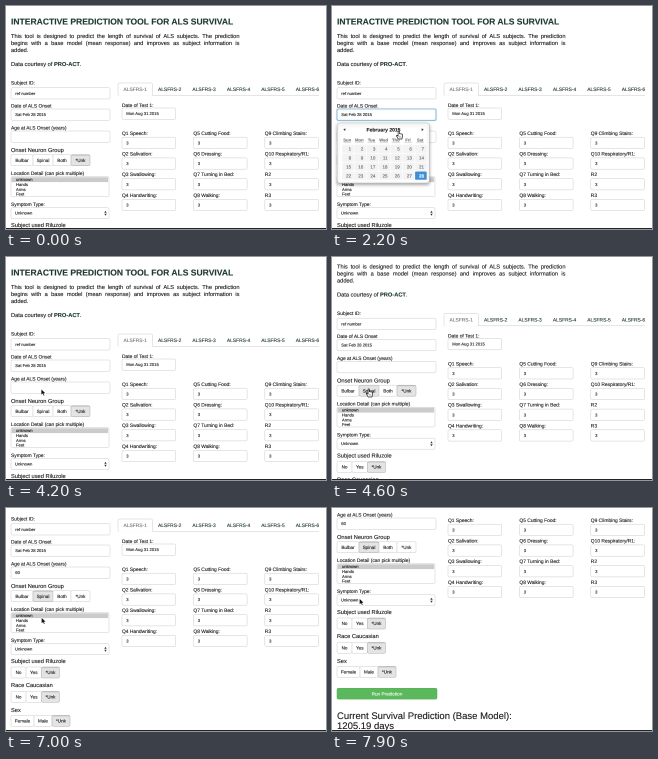
An HTML page with a canvas that plays this animation: 320 px wide and 223 px high, repeating every 8 s.

```html
<!DOCTYPE html>
<html lang="en">
<head>
<meta charset="utf-8">
<title>Prediction form</title>
<style>
  html, body { margin: 0; width: 100%; height: 100%; overflow: hidden; background: #fff; }
  canvas { display: block; width: 320px; height: 223px; }
</style>
</head>
<body>
<canvas id="stage" width="640" height="446"></canvas>
<script>
const ctx = document.getElementById('stage').getContext('2d');
const LOOP = 8000, STEP = 100;
const INK = '#1c1c1c', GREEN = '#1f3a2e', LINE = '#ccc', BLUE = '#6aa6c6';
const FAMILY = '"Liberation Sans", Arial, sans-serif';
const HEADING = 5.7, LABEL = 4.9, BUTTON = 4.6, SMALL = 4.15;

const PICKER = [1600, 3200], DATE_FOCUS = [1500, 3300], AGE_FOCUS = [5400, 6600];
const SCROLL = [[0, 0], [4600, 20.5], [4700, 21], [6800, 47], [6900, 62], [7000, 66], [7400, 114], [7500, 114.5], [7700, 115]];
const POINTER = [
  [200, 268, 198, 'arrow'], [400, 170, 120, 'arrow'], [600, 40, 48, 'arrow'], [700, 9, 75, 'arrow'],
  [900, 63, 104, 'arrow'], [1200, 63, 104, 'arrow'], [1300, 67, 109, 'beam'], [1700, 67, 109, 'beam'],
  [1800, 72, 119, 'arrow'], [1900, 67, 128.5, 'hand'], [2100, 67, 128.5, 'hand'], [2200, 67.5, 129, 'hand'],
  [2500, 67.5, 129, 'hand'], [2600, 77, 146, 'hand'], [2700, 91, 163, 'hand'], [2800, 91, 163, 'hand'],
  [3000, 90.5, 170, 'hand'], [3100, 90.5, 170, 'hand'], [3200, 89.5, 167, 'arrow'], [3500, 89.5, 167, 'arrow'],
  [3800, 52, 118, 'arrow'], [4000, 35, 131, 'arrow'], [4200, 35.2, 132, 'arrow'], [4600, 37.5, 136, 'hand'],
  [4800, 37.5, 136, 'hand'], [4900, 37.5, 124, 'arrow'], [5000, 37, 113, 'beam'], [5200, 37, 113, 'beam'],
  [5300, 37, 111, 'beam'], [6200, 37, 111, 'none'], [6600, 35.5, 109.5, 'arrow'], [7300, 35.5, 109.5, 'arrow'],
  [7400, 36, 118, 'arrow'], [7900, 27.5, 90.5, 'arrow']
];

const within = (t, [from, to]) => t >= from && t < to;

function latest(keys, t) {
  let i = keys.length - 1;
  while (i >= 0 && keys[i][0] > t) i--;
  return i;
}

function setFont(size, bold) {
  ctx.font = `${bold ? 'bold ' : ''}${size}px ${FAMILY}`;
}

// y is the middle of the capital letters; the thin stroke thickens small type
function text(str, x, y, size = LABEL, { color = INK, bold = false, align = 'left' } = {}) {
  setFont(size, bold);
  ctx.fillStyle = ctx.strokeStyle = color;
  ctx.lineWidth = 0.12;
  ctx.textAlign = align;
  ctx.fillText(str, x, y + size * 0.36);
  ctx.strokeText(str, x, y + size * 0.36);
  return ctx.measureText(str).width;
}

function justified(str, x, y, width) {
  setFont(HEADING);
  const words = str.split(' ');
  const widths = words.map(w => ctx.measureText(w).width);
  const gap = (width - widths.reduce((a, b) => a + b)) / (words.length - 1);
  words.forEach((w, i) => {
    text(w, x, y, HEADING);
    x += widths[i] + gap;
  });
}

function box(x, y, w, h, { fill = '#fff', stroke = LINE, radius = 1.3, line = 0.5 } = {}) {
  ctx.beginPath();
  ctx.roundRect(x, y, w, h, radius);
  ctx.fillStyle = fill;
  ctx.fill();
  if (!stroke) return;
  ctx.strokeStyle = stroke;
  ctx.lineWidth = line;
  ctx.stroke();
}

function rule(x1, y1, x2, y2, color = LINE, width = 0.5) {
  ctx.strokeStyle = color;
  ctx.lineWidth = width;
  ctx.beginPath();
  ctx.moveTo(x1, y1);
  ctx.lineTo(x2, y2);
  ctx.stroke();
}

function shape(points, fill, stroke) {
  ctx.beginPath();
  points.forEach(([x, y]) => ctx.lineTo(x, y));
  ctx.closePath();
  ctx.fillStyle = fill;
  ctx.fill();
  if (!stroke) return;
  ctx.strokeStyle = stroke;
  ctx.lineWidth = 0.7;
  ctx.stroke();
}

function field(x, y, w, value, focused = false, caret = false) {
  ctx.save();
  if (focused) {
    ctx.shadowColor = 'rgba(80,150,200,.45)';
    ctx.shadowBlur = 3;
  }
  box(x, y, w, 11.3, { stroke: focused ? BLUE : LINE, line: focused ? 0.6 : 0.5 });
  ctx.restore();
  const width = text(value, x + 4.3, y + 5.7, SMALL);
  if (caret) rule(x + 5 + width, y + 3.2, x + 5 + width, y + 8.8, '#222');
}

function buttons(y, items, active, hover) {
  let x = 5;
  for (const [label, w] of items) {
    const pressed = label === active || label === hover;
    box(x, y, w, 11, { fill: pressed ? '#e4e4e4' : '#fff', stroke: pressed ? '#adadad' : LINE });
    if (label === active) rule(x + 0.5, y + 0.7, x + w - 0.5, y + 0.7, '#c4c4c4', 0.8);
    text(label, x + w / 2, y + 5.5, BUTTON, { align: 'center' });
    x += w;
  }
}

function intro() {
  text('INTERACTIVE PREDICTION TOOL FOR ALS SURVIVAL', 5, 15.6, 8.55, { color: GREEN, bold: true });
  justified('This tool is designed to predict the length of survival of ALS subjects. The prediction', 5, 29.8, 228.5);
  justified('begins with a base model (mean response) and improves as subject information is', 5, 36.8, 228.5);
  text('added.', 5, 43.8, HEADING);
  let x = 5 + text('Data courtesy of ', 5, 58, HEADING);
  x += text('PRO-ACT', x, 58, HEADING, { color: GREEN, bold: true });
  text('.', x, 58, HEADING);
}

function symptomForm(t) {
  const choice = [['No', 15], ['Yes', 15.5], ['*Unk', 18]];
  text('Subject ID:', 5, 76.8);
  field(5, 81.7, 99, 'ref number');

  const dateCaret = within(t, [1500, 1900]) || within(t, [2400, 2900]);
  text('Date of ALS Onset', 5, 99.8);
  field(5, 103, 99, 'Sat Feb 28 2015', within(t, DATE_FOCUS), dateCaret);

  const age = '60'.slice(0, t < 6200 ? 0 : t < 6300 ? 1 : 2);
  const ageCaret = within(t, [5400, 5900]) || within(t, [6200, 6600]);
  text('Age at ALS Onset (years)', 5, 121.8);
  field(5, 125, 99, age, within(t, AGE_FOCUS), ageCaret);

  text('Onset Neuron Group', 5, 144, HEADING);
  buttons(148.7, [['Bulbar', 22], ['Spinal', 20], ['Both', 18], ['*Unk', 19]],
    t < 4700 ? '*Unk' : 'Spinal', within(t, [4600, 4900]) ? 'Spinal' : '');

  text('Location Detail (can pick multiple)', 5, 167);
  box(5, 170.7, 98, 19.8);
  ctx.fillStyle = '#cbcbcb';
  ctx.fillRect(5.6, 171.3, 96.5, 4.8);
  ['unknown', 'Hands', 'Arms', 'Feet'].forEach((s, i) => text(s, 10, 173.7 + i * 4.85, SMALL));

  text('Symptom Type:', 5, 198);
  box(5, 201.7, 98, 11);
  text('Unknown', 9, 207.2, SMALL);
  shape([[98.3, 206.7], [99.5, 204.7], [100.7, 206.7]], '#333');
  shape([[98.3, 207.7], [99.5, 209.7], [100.7, 207.7]], '#333');

  text('Subject used Riluzole', 5, 219, HEADING);
  buttons(225, choice, '*Unk');
  text('Race Caucasian', 5, 243, HEADING);
  buttons(249.3, choice, '*Unk');
  text('Sex', 5, 268, HEADING);
  buttons(273.3, [['Female', 23], ['Male', 18], ['*Unk', 18]], '*Unk');

  box(5, 295.3, 100, 10.8, { fill: '#5cb85c', stroke: '#4cae4c' });
  text('Run Prediction', 55, 300.8, 4.7, { color: '#fff', align: 'center' });
  text('Current Survival Prediction (Base Model):', 5, 322.7, 9.5);
  text('1205.19 days', 5, 332.6, 9.5);
}

function scoreForm() {
  rule(112, 89.3, 313, 89.3);
  box(112, 77, 34.5, 12.3);
  rule(112.4, 89.3, 146.1, 89.3, '#fff', 0.9);
  for (let i = 0; i < 6; i++) {
    text('ALSFRS-' + (i + 1), 117.5 + i * 34.45, 83.2, LABEL, { color: i ? GREEN : '#777' });
  }
  text('Date of Test 1:', 116, 99.1);
  field(116, 102, 53.7, 'Mon Aug 31 2015');

  const columns = [
    ['Q1 Speech:', 'Q2 Salivation:', 'Q3 Swallowing:', 'Q4 Handwriting:'],
    ['Q5 Cutting Food:', 'Q6 Dressing:', 'Q7 Turning in Bed:', 'Q8 Walking:'],
    ['Q9 Climbing Stairs:', 'Q10 Respiratory/R1:', 'R2', 'R3']
  ];
  columns.forEach((labels, c) => labels.forEach((label, r) => {
    const x = 116 + c * 71.4, y = 127 + r * 20.7;
    text(label, x, y);
    field(x, y + 4.2, 53.7, '3');
  }));
}

function datePicker() {
  const pitch = 12.15;
  ctx.save();
  ctx.shadowColor = 'rgba(0,0,0,.35)';
  ctx.shadowBlur = 6;
  ctx.shadowOffsetY = 3;
  box(5.3, 117, 92, 60, { stroke: '#bbb', radius: 2 });
  ctx.restore();
  text('February 2015', 51.5, 123.6, 5, { bold: true, align: 'center' });
  shape([[11.3, 123.6], [13.3, 122.2], [13.3, 125]], '#333');
  shape([[91.7, 123.6], [89.7, 122.2], [89.7, 125]], '#333');
  'Sun Mon Tue Wed Thu Fri Sat'.split(' ').forEach((day, i) => {
    const x = 15.2 + i * pitch;
    text(day, x, 134.2, 4.2, { color: '#777', bold: true, align: 'center' });
    rule(x - 4, 136.8, x + 4, 136.8, '#aaa', 0.4);
  });
  for (let d = 0; d < 28; d++) {
    const x = 16 + d % 7 * pitch, y = 142.8 + Math.floor(d / 7) * 8.95, chosen = d === 27;
    box(x - 5.8, y - 4.1, 11.6, 8.2, { fill: chosen ? '#3f8fd6' : '#f3f3f3', stroke: null, radius: 0.8 });
    text(String(d + 1), x + 3.1, y, 4.5, { color: chosen ? '#fff' : '#666', bold: chosen, align: 'right' });
  }
}

const cursors = {
  none() {},
  arrow() {
    shape([[0, 0], [0, 6.2], [1.5, 4.9], [2.5, 7.1], [3.5, 6.6], [2.6, 4.5], [4.5, 4.4]], '#111', '#fff');
    shape([[0.2, 0.5], [0.2, 5.6], [1.6, 4.4], [2.6, 6.6], [3.1, 6.3], [2.2, 4.1], [3.9, 4.1]], '#111');
  },
  beam() {
    rule(0, -3.2, 0, 3.2, '#222', 0.7);
    rule(-1.3, -3.4, 1.3, -3.4, '#222');
    rule(-1.3, 3.4, 1.3, 3.4, '#222');
  },
  hand() {
    shape([[-1.4, -4], [-0.3, -4], [-0.1, -1.4], [2.6, -0.9], [3.1, 0.2], [2.5, 4], [-1.3, 4], [-3.1, 0.8], [-2.5, 0.2], [-1.4, 1.1]], '#fff', '#222');
    rule(0.3, 0.8, 0.3, 2.8, '#555', 0.4);
    rule(1.4, 0.8, 1.4, 2.8, '#555', 0.4);
  }
};

function pointer(t) {
  const i = latest(POINTER, t);
  if (i < 0) return;
  const [t0, x0, y0, kind] = POINTER[i];
  const [t1, x1, y1, nextKind] = POINTER[i + 1] || POINTER[i];
  // the pointer glides while its kind stays, and jumps when it changes
  const k = t1 > t0 && nextKind === kind ? (t - t0) / (t1 - t0) : 0;
  ctx.save();
  ctx.translate(x0 + (x1 - x0) * k, y0 + (y1 - y0) * k);
  cursors[kind]();
  ctx.restore();
}

function draw(t) {
  ctx.setTransform(2, 0, 0, 2, 0, 0);
  ctx.textRendering = 'geometricPrecision';
  ctx.lineJoin = 'round';
  ctx.fillStyle = '#fff';
  ctx.fillRect(0, 0, 320, 223);
  ctx.save();
  ctx.translate(0, -SCROLL[latest(SCROLL, t)][1]);
  intro();
  symptomForm(t);
  scoreForm();
  if (within(t, PICKER)) datePicker();
  ctx.restore();
  pointer(t);
  ctx.fillStyle = '#222';
  ctx.fillRect(0, 222, 320, 1);
}

const start = performance.now();
function frame() {
  const t = (performance.now() - start) % LOOP;
  draw(Math.floor(t / STEP) * STEP);
  requestAnimationFrame(frame);
}
frame();
</script>
</body>
</html>
```
